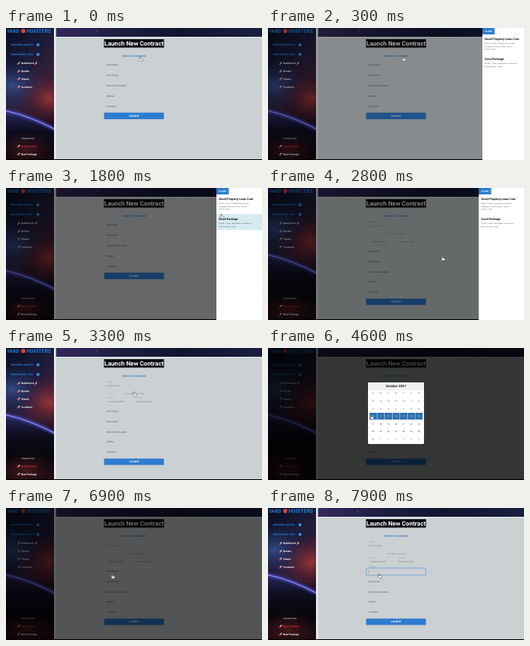
Animation of 320 by 165 pixels, one loop 8 s. Source, as an HTML page:

```html
<!DOCTYPE html>
<html lang="en">
<head>
<meta charset="utf-8">
<title>Launch New Contract</title>
<style>
html, body { margin: 0; width: 100%; height: 100%; overflow: hidden; background: #000; }
svg { display: block; width: 100vw; height: 100vh; }
text { font: 2.7px Roboto, Arial, sans-serif; text-rendering: geometricPrecision; white-space: pre; }
.b { font-weight: 700; }
.mid { text-anchor: middle; }
#short, #long, #blank, #focus, #calendar, #week, #day, #hover { visibility: hidden; animation: 8s step-end infinite; }
#short { animation-name: short; }
#long { animation-name: long; }
#blank { animation-name: blank; }
#focus { animation-name: focus; }
#calendar { animation-name: calendar; }
#week { animation-name: week; }
#day { animation-name: day; }
#hover { animation-name: hover; }
#planet { animation: planet 8s step-end infinite; }
#shade { opacity: 0; animation: shade 8s linear infinite; }
#drawer { transform: translateX(60px); animation: drawer 8s cubic-bezier(.25,.7,.3,1) infinite; }
#cursor { animation: cursor 8s ease-in-out infinite; }
#stars { animation: drift 8s linear infinite; }
@keyframes short { 0% { visibility: visible } 23.75%, 100% { visibility: hidden } }
@keyframes long { 0% { visibility: hidden } 23.75%, 100% { visibility: visible } }
@keyframes blank { 0% { visibility: hidden } 23.75% { visibility: visible } 95%, 100% { visibility: hidden } }
@keyframes focus { 0% { visibility: hidden } 95%, 100% { visibility: visible } }
@keyframes calendar { 0% { visibility: hidden } 42.5% { visibility: visible } 86.25%, 100% { visibility: hidden } }
@keyframes day { 0% { visibility: hidden } 42.5% { visibility: visible } 56.25%, 100% { visibility: hidden } }
@keyframes week { 0% { visibility: hidden } 56.25% { visibility: visible } 86.25%, 100% { visibility: hidden } }
@keyframes hover { 0% { visibility: hidden } 11.25% { visibility: visible } 27.5%, 100% { visibility: hidden } }
@keyframes planet { 0% { transform: translateY(20px) } 23.75%, 100% { transform: none } }
@keyframes shade {
  0%, 1.25% { opacity: 0 } 5%, 35% { opacity: .5 } 39.5%, 42.45% { opacity: 0 }
  42.5%, 86.2% { opacity: .74 } 86.25% { opacity: .6 } 90%, 100% { opacity: 0 }
}
@keyframes drawer {
  0%, 1.25% { transform: translateX(60px) } 6%, 35% { transform: none } 40%, 100% { transform: translateX(60px) }
}
@keyframes cursor {
  0%, 3% { transform: translate(168.5px, 38.5px) }
  11.5%, 25% { transform: translate(270px, 35.5px) }
  33.5%, 35.5% { transform: translate(219px, 88px) }
  40.5%, 44% { transform: translate(161px, 57.5px) }
  54%, 60% { transform: translate(130px, 86.5px) }
  70%, 85% { transform: translate(133.5px, 85.5px) }
  94%, 100% { transform: translate(140px, 85px) }
}
@keyframes drift { to { transform: translate(-2px, .5px) } }
</style>
</head>
<body>
<svg viewBox="0 0 320 165" preserveAspectRatio="none">
  <defs>
    <linearGradient id="sky" x2=".4" y2="1">
      <stop stop-color="#0a0d20"/><stop offset=".3" stop-color="#171a36"/>
      <stop offset=".6" stop-color="#33203a"/><stop offset="1" stop-color="#160d18"/>
    </linearGradient>
    <linearGradient id="bar">
      <stop stop-color="#352a58"/><stop offset=".25" stop-color="#211f48"/>
      <stop offset=".6" stop-color="#10142e"/><stop offset="1" stop-color="#1a1f40"/>
    </linearGradient>
    <radialGradient id="red">
      <stop stop-color="#a83a38" stop-opacity=".85"/><stop offset="1" stop-color="#58182c" stop-opacity="0"/>
    </radialGradient>
    <radialGradient id="blue">
      <stop stop-color="#3f5fa4" stop-opacity=".7"/><stop offset="1" stop-color="#182a5c" stop-opacity="0"/>
    </radialGradient>
    <linearGradient id="ground" x2="0" y2="1">
      <stop stop-color="#2b2860"/><stop offset=".3" stop-color="#0d0d1e"/>
      <stop offset=".6" stop-color="#07060c"/><stop offset="1" stop-color="#1c0b10"/>
    </linearGradient>
    <filter id="soft"><feGaussianBlur stdDeviation="1.3"/></filter>
    <clipPath id="side"><rect width="60" height="164"/></clipPath>
  </defs>

  <rect width="320" height="165" fill="#000"/>
  <rect x="60" width="260" height="164" fill="#e9ecee"/>
  <rect x="62.5" width="257.5" height="11" fill="url(#bar)"/>
  <g clip-path="url(#side)">
    <rect width="60" height="164" fill="url(#sky)"/>
    <g id="planet">
      <ellipse cx="8" cy="52" rx="42" ry="34" fill="url(#blue)"/>
      <ellipse cx="54" cy="68" rx="38" ry="34" fill="url(#red)"/>
      <path d="M-2 83Q30 90 62 107V170H-2Z" fill="url(#ground)"/>
      <path d="M-2 83Q30 90 62 107" fill="none" stroke="#4a48c8" stroke-width="5" opacity=".7" filter="url(#soft)"/>
      <path d="M-2 83Q30 90 62 107" fill="none" stroke="#a9b0ff" stroke-width="1.1" opacity=".8"/>
    </g>
    <ellipse cx="25" cy="152" rx="44" ry="24" fill="url(#red)" opacity=".4"/>
  </g>
  <g id="stars" fill="#bcc8ee"></g>
  <g id="nav"></g>

  <rect x="62.5" y="12" width="257.5" height="152" fill="#cbd0d3"/>
  <rect x="122.5" y="14" width="75" height="10.5" fill="#05060c"/>
  <text class="b mid" x="160" y="22" style="font-size:7.7px" fill="#fff">Launch New Contract</text>
  <text class="b mid" x="160" y="36" style="font-size:2.9px;letter-spacing:.18px" fill="#2270c5">SELECT A PACKAGE</text>
  <g id="short"></g>
  <g id="long"></g>
  <g id="blank"></g>
  <g id="focus">
    <rect x="122.8" y="75" width="74.4" height="9" rx=".7" fill="none" stroke="#4a90df" stroke-width=".6"/>
    <path d="M126 77.3v4.2" stroke="#333" stroke-width=".3"/>
  </g>

  <rect id="shade" width="320" height="165"/>

  <g id="drawer">
    <rect x="263" width="57" height="165" fill="#fff"/>
    <rect id="hover" x="263" y="32.5" width="57" height="20" fill="#d5ebf0"/>
    <rect x="263" width="15.5" height="8" fill="#2e7dd1"/>
  </g>

  <g id="calendar">
    <rect x="125" y="43" width="70" height="77" rx="1.2" fill="#fff"/>
    <path d="M125 53V44.2Q125 43 126.2 43H193.8Q195 43 195 44.2V53Z" fill="#f0f1f2"/>
    <g id="dates"></g>
    <g id="day"></g>
    <g id="week"></g>
  </g>

  <g id="cursor">
    <path d="M-1.7-2.6Q-1.2-3.4-.6-2.6V-.5L1.7 0Q2.5.3 2.3 1.2L1.8 2.8H-.8L-2.5.7Q-2.3-.2-1.7.3Z"
      fill="#fff" stroke="#222" stroke-width=".45"/>
  </g>
</svg>
<script>
const $ = id => document.getElementById(id);

function add(parent, tag, attrs, content) {
  const el = document.createElementNS('http://www.w3.org/2000/svg', tag);
  for (const key in attrs) el.setAttribute(key, attrs[key]);
  if (content !== undefined) el.textContent = content;
  parent.appendChild(el);
  return el;
}

function label(parent, x, y, str, size = 2.7, fill = '#4a4f53', cls = '') {
  return add(parent, 'text', { x, y, fill, class: cls, style: `font-size:${size}px` }, str);
}

// Stars
for (let i = 0; i < 60; i++) {
  const rand = k => Math.abs(Math.sin(i * k + 3) * 4375.85) % 1;
  const top = i > 30;
  add($('stars'), 'circle', {
    cx: top ? 65 + rand(12.98) * 255 : rand(7.23) * 58,
    cy: top ? 1 + rand(4.14) * 8 : rand(9.41) * 75,
    r: .15 + rand(5.7) * .18, opacity: .2 + rand(2.6) * .4
  });
}
add($('stars'), 'circle', { cx: 114, cy: 3.5, r: .6, opacity: .8 });

// Sidebar
const nav = $('nav');
function rocket(x, y) {
  const g = add(nav, 'g', { transform: `translate(${x} ${y}) rotate(45)` });
  add(g, 'ellipse', { rx: .8, ry: 2, fill: '#d9dce3' });
  add(g, 'path', { d: 'M-1.4 1.8L0 .3L1.4 1.8L0 3Z', fill: '#d93432' });
}
label(nav, 1, 6, 'YARD', 6.2, '#2b7bd2', 'b');
add(nav, 'circle', { cx: 21.6, cy: 3.8, r: 2.7, fill: '#cf4444' });
label(nav, 25.5, 6, 'HOISTERS', 6.5, '#2b7bd2', 'b');
['INCOMING QUOTES', 'UNASSIGNED JOBS'].forEach((str, i) => {
  const y = 21 + i * 12;
  label(nav, 6, y + 1, str, 3.1, '#2b7bd2', 'b');
  add(nav, 'circle', { cx: 40, cy: y, r: 2, fill: '#2b7bd2' });
  add(nav, 'circle', { cx: 40, cy: y, r: .6, fill: '#cfe1f5' });
});
[['Dashboard', 44], ['Quotes', 54], ['Clients', 63.5], ['Contracts', 73.5],
 ['Create Forms', 137.5], ['New Contract', 147.5], ['New Package', 157.5]].forEach(([str, y]) => {
  const plain = str === 'Create Forms';
  const fill = str === 'New Contract' ? '#e0292c' : '#fff';
  label(nav, 19, y + 1.1, str, plain ? 2.8 : 3.2, fill, plain ? '' : 'b');
  if (!plain) rocket(16, y);
});
rocket(37.5, 44);

// Form
const fields = ['Client Name', 'Client Email', 'Client Phone Number', 'Address', 'Job Notes'];
function form(parent, top, button, skip) {
  fields.forEach((str, i) => i >= skip && label(parent, 125.5, top + i * 12.8 + 1, str));
  add(parent, 'rect', { x: 122.6, y: button, width: 74.8, height: 8.1, rx: .5, fill: '#2f7cd0' });
  label(parent, 160, button + 5.1, 'LAUNCH', 3.2, '#fff', 'b mid');
}
form($('short'), 46.3, 105.8, 0);
const long = $('long');
const faint = '#80868a';
label(long, 125.5, 42.6, 'Package', 1.9, faint);
label(long, 125.5, 47.9, 'Good Package', 2.7, faint);
label(long, 160.5, 58, 'Start Date - End Date', 2.5, faint, 'mid');
['10', '16'].forEach((day, i) => {
  const x = 128 + i * 35;
  label(long, x, 62.5, i ? 'End Date' : 'Start Date', 1.9, '#959b9f');
  label(long, x, 67.6, `October ${day}, 2021`, 2.6, '#6b7175');
});
form(long, 79, 138.2, 1);
label($('blank'), 125.5, 80, fields[0]);
label($('focus'), 125.5, 73.8, fields[0], 1.8, faint);

// Drawer
const drawer = $('drawer');
label(drawer, 270.7, 5.1, 'CLOSE', 2.9, '#fff', 'b mid');
[['Small Property Lawn Care', 14.5, '$1000 - 31 days - Includes lawn care and', 'weeding for one acre or less. - Service', 'Interval: 7 days'],
 ['Good Package', 39.5, '$12000 - 7 days - Wide Walks - Good service', 'Service Interval: 1 days']].forEach(([name, y, ...lines]) => {
  label(drawer, 266, y, name, 3.7, '#111', 'b');
  lines.forEach((str, i) => label(drawer, 266, y + 5.8 + i * 3.4, str, 2.1, '#555'));
});

// Calendar
const dates = $('dates');
const colX = col => 131.3 + col * 9.55;
function picked(parent, col) {
  add(parent, 'rect', { x: colX(col) - 4.4, y: 81, width: 9.1, height: 8.5, fill: '#2d70af' });
  label(parent, colX(col), 86.1, 10 + col, 2.6, '#fff', 'mid');
}
label(dates, 160, 49.3, 'October 2021', 4.2, '#222', 'b mid');
['Su', 'Mo', 'Tu', 'We', 'Th', 'Fr', 'Sa'].forEach((str, col) => {
  label(dates, colX(col), 56.8, str, 2.2, '#555', 'mid');
  picked($('week'), col);
});
picked($('day'), 0);
for (let i = 0; i < 42; i++) {
  const date = new Date(2021, 8, 26 + i);
  const fill = date.getMonth() === 9 ? '#333' : '#777';
  label(dates, colX(i % 7), 67 + Math.floor(i / 7) * 9.55, date.getDate(), 2.6, fill, 'mid');
}
</script>
</body>
</html>
```
